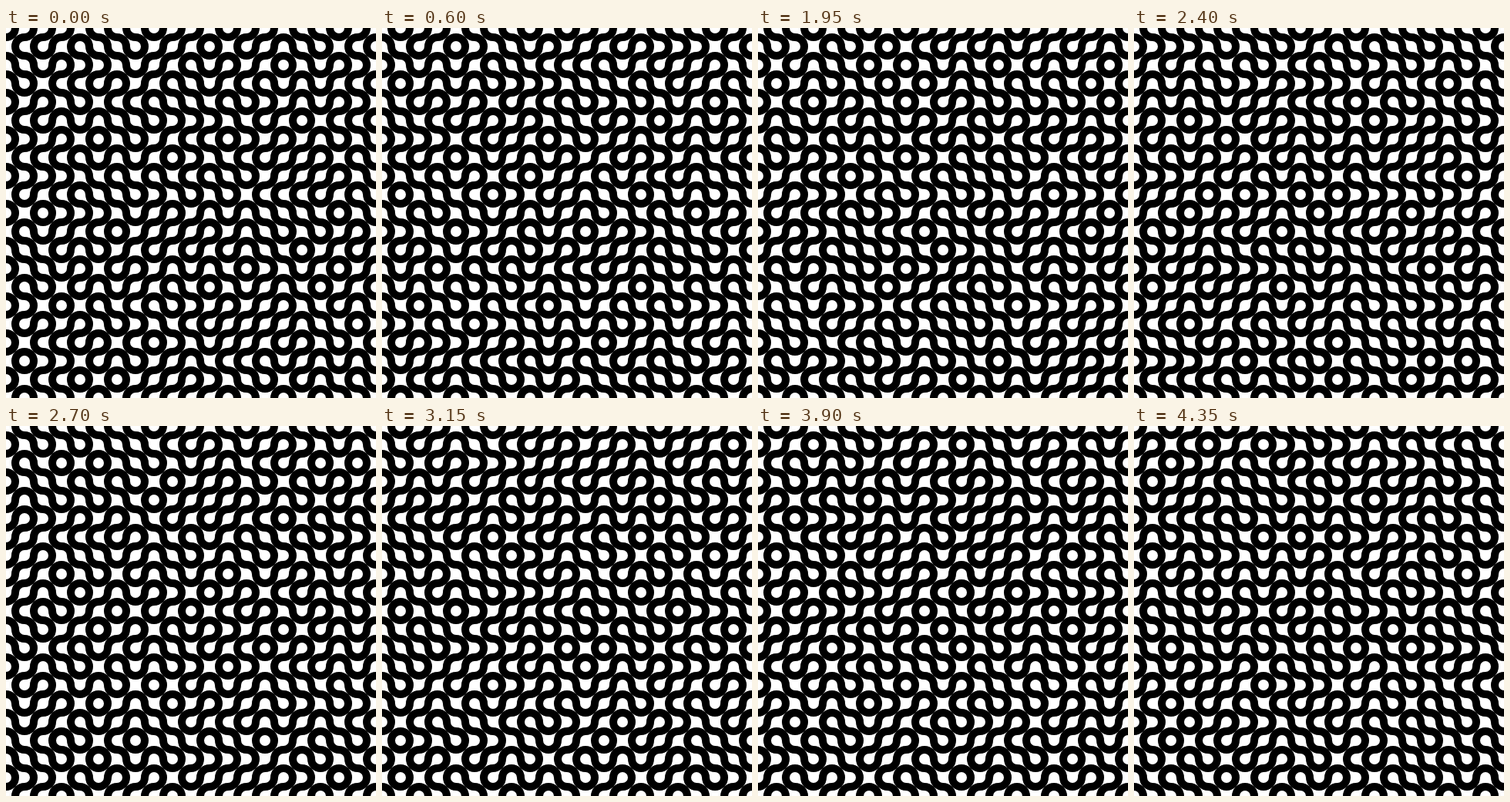
Animation of 480x480 px, one loop 4500 ms. Source, as an HTML page:

```html
<!DOCTYPE html>
<html lang="en">
<head>
<meta charset="utf-8">
<title>Truchet tiles</title>
<style>
  html, body { margin: 0; width: 100%; height: 100%; overflow: hidden; background: #fff; }
  svg { display: block; width: 100%; height: 100%; }
</style>
</head>
<body>
<svg viewBox="0 0 480 480">
  <rect width="480" height="480" fill="#fff"/>
  <path id="tiles" fill="none" stroke="#000" stroke-width="10"/>
</svg>
<script>
  const SIZE = 24, COUNT = 20, R = SIZE / 2;
  const STEP = 150, LOOP = 4500;
  const tiles = document.getElementById('tiles');

  function seeded(seed) {
    return () => {
      seed = (seed + 0x6D2B79F5) | 0;
      let t = Math.imul(seed ^ (seed >>> 15), 1 | seed);
      t = (t + Math.imul(t ^ (t >>> 7), 61 | t)) ^ t;
      return ((t ^ (t >>> 14)) >>> 0) / 4294967296;
    };
  }

  // Two quarter circles around opposite corners of one tile.
  function tile(x, y, flip) {
    const arc = `a${R} ${R} 0 0 `;
    return flip
      ? `M${x + R} ${y}${arc}0 ${R} ${R}M${x} ${y + R}${arc}1 ${R} ${R}`
      : `M${x + R} ${y}${arc}1 ${-R} ${R}M${x + SIZE} ${y + R}${arc}0 ${-R} ${R}`;
  }

  function pattern(step) {
    const random = seeded(1000 + step * 7919);
    let d = '';
    for (let row = 0; row < COUNT; row++) {
      for (let col = 0; col < COUNT; col++) {
        d += tile(col * SIZE, row * SIZE, random() < 0.5);
      }
    }
    return d;
  }

  let shown = -1;

  function draw(time) {
    const step = Math.floor((time % LOOP) / STEP);
    if (step === shown) return;
    shown = step;
    tiles.setAttribute('d', pattern(step));
  }

  const start = performance.now();

  function tick() {
    draw(performance.now() - start);
    requestAnimationFrame(tick);
  }

  tick();
</script>
</body>
</html>
```
